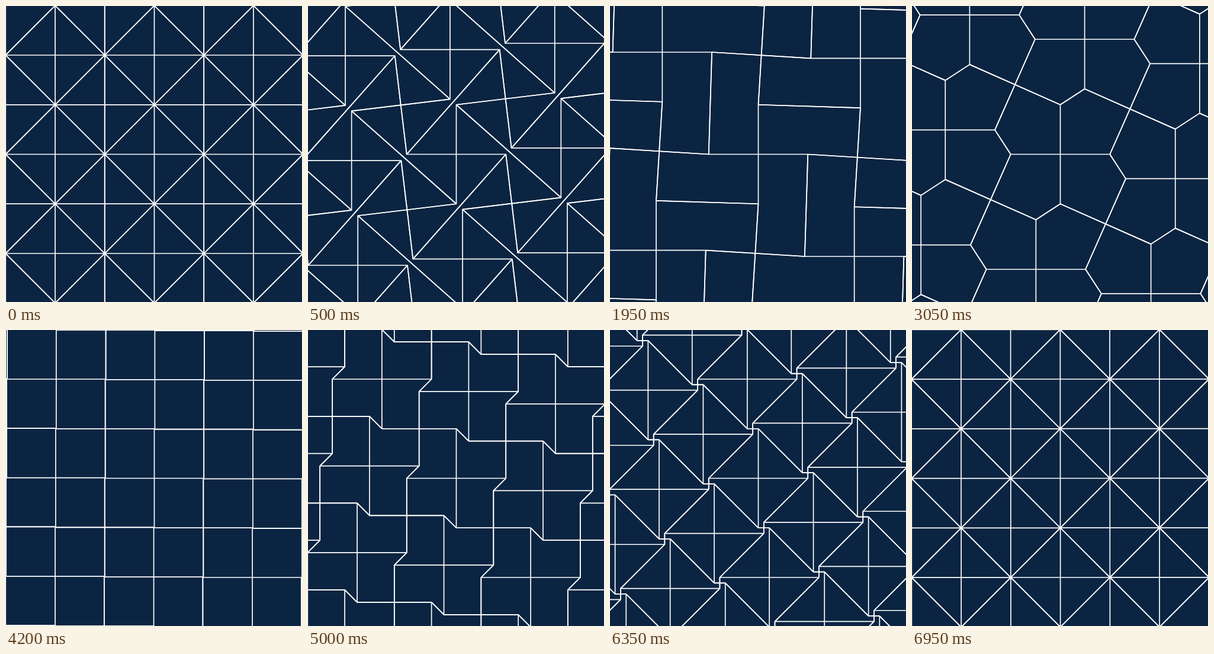
Write an HTML page with a canvas that moves like this. It is 500 by 500 pixels and loops after 7 s.

```html
<!DOCTYPE html>
<html lang="en">
<head>
<meta charset="utf-8">
<title>Tiling</title>
<style>
  html, body { margin: 0; width: 100%; height: 100%; overflow: hidden; background: #0b2441; }
  canvas { display: block; width: 500px; height: 500px; }
</style>
</head>
<body>
<canvas id="stage" width="500" height="500"></canvas>
<script>
const ctx = document.getElementById('stage').getContext('2d');
const LOOP = 7000, ARC = 4000, STEP = 50;
const ARM = 83.75, MID = 250.5, REACH = 6;

const ease = u => (1 - Math.cos(Math.PI * u)) / 2;
const turn = ([x, y]) => [y, -x];

// Lattice vector in arm lengths: a half circle around (1, 1), then straight to its centre.
function lattice(t) {
  if (t < ARC) {
    const angle = Math.PI * (0.75 - ease(t / ARC));
    return [1 + Math.SQRT2 * Math.cos(angle), 1 + Math.SQRT2 * Math.sin(angle)];
  }
  const p = ease((t - ARC) / (LOOP - ARC));
  return [2 - p, p];
}

// A cross whose arm ends link to the opposite ends of two neighbouring crosses.
function drawCross(cx, cy, a) {
  let dir = [ARM, 0];
  for (let k = 0; k < 4; k++) {
    const b = turn(a);
    const x = cx - dir[0] + a[0], y = cy - dir[1] + a[1];
    ctx.beginPath();
    ctx.moveTo(cx, cy);
    ctx.lineTo(cx + dir[0], cy + dir[1]);
    ctx.moveTo(x, y);
    ctx.lineTo(cx + dir[0], cy + dir[1]);
    ctx.lineTo(x + b[0], y + b[1]);
    ctx.stroke();
    dir = turn(dir);
    a = b;
  }
}

function draw(t) {
  ctx.fillStyle = '#0b2441';
  ctx.fillRect(0, 0, 500, 500);
  ctx.strokeStyle = '#fff';
  ctx.lineWidth = 1.7;
  ctx.lineJoin = 'round';
  const a = lattice(t).map(v => v * ARM);
  const b = turn(a);
  for (let i = -REACH; i <= REACH; i++) {
    for (let j = -REACH; j <= REACH; j++) {
      drawCross(MID + i * a[0] + j * b[0], MID + i * a[1] + j * b[1], a);
    }
  }
}

const start = performance.now();
let shown = -1;

function tick() {
  const now = Math.max(0, performance.now() - start) % LOOP;
  const t = Math.floor(now / STEP) * STEP;
  if (t !== shown) draw(shown = t);
  requestAnimationFrame(tick);
}
tick();
</script>
</body>
</html>
```
